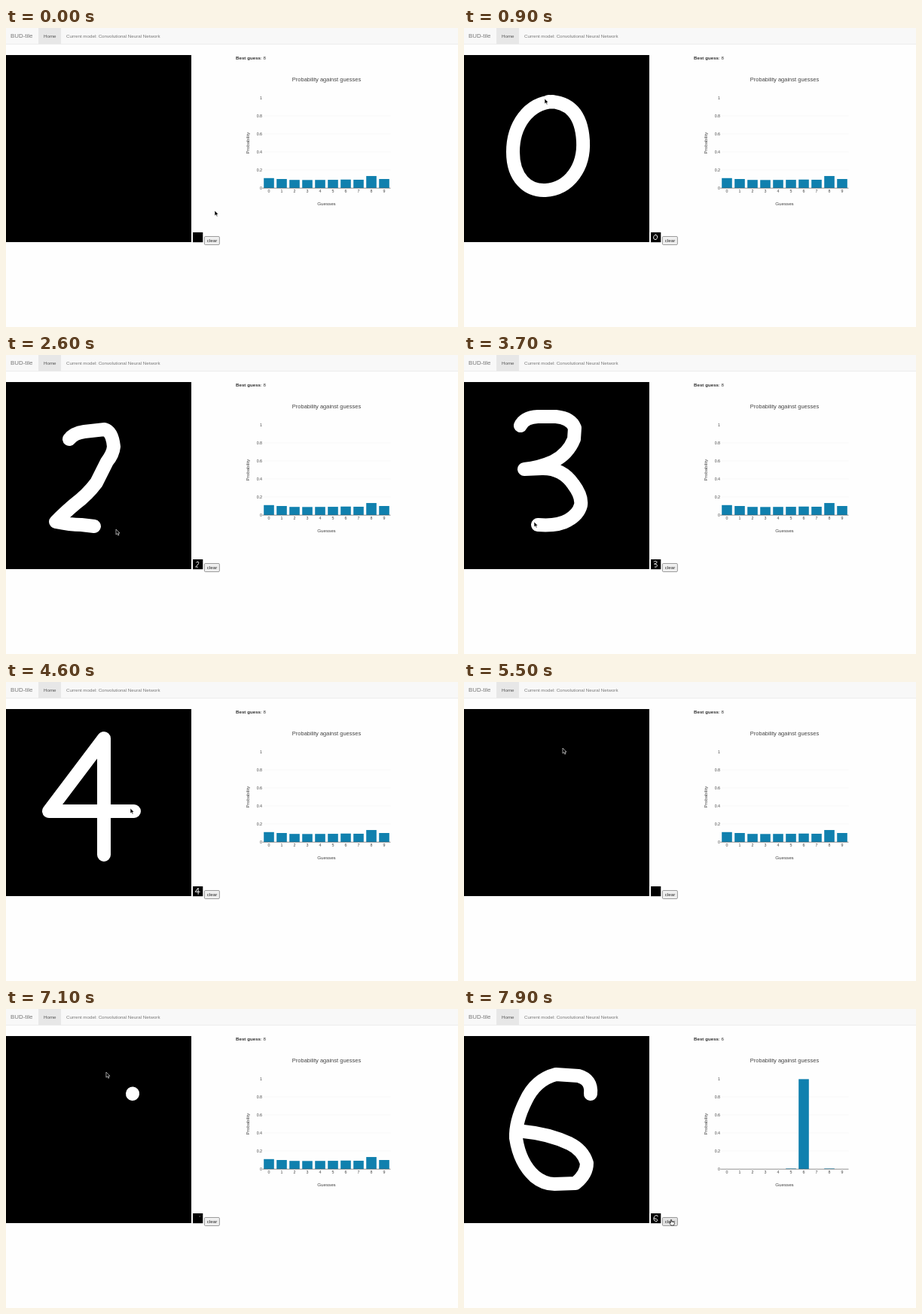
Animation, 600 px wide and 398 px high, one loop 8000 ms. Source, as an HTML page:

```html
<!DOCTYPE html>
<html>
<head>
<meta charset="utf-8">
<style>
  html, body { margin: 0; width: 100%; height: 100%; overflow: hidden; background: #fefefe; }
  svg { display: block; font: 6.2px "Liberation Sans", Arial, sans-serif; }
  #chart { fill: #444; text-anchor: middle; }
  .tick { font-size: 5.3px; }
</style>
</head>
<body>
<svg width="600" height="398" viewBox="0 0 600 398">
  <rect width="600" height="21.5" fill="#f8f8f8"/>
  <rect y="21.3" width="600" height=".6" fill="#e4e4e4"/>
  <rect x="43" width="30" height="21.5" fill="#e7e7e7"/>
  <g fill="#777">
    <text x="6" y="13.4" font-size="7.9">BUD-tile</text>
    <text x="50" y="13" fill="#555">Home</text>
    <text x="80" y="13">Current model: Convolutional Neural Network</text>
  </g>
  <rect y="36" width="246" height="249"/>
  <rect x="248" y="272" width="13.3" height="13.2"/>
  <path id="ink" pathLength="1" fill="none" stroke="#fff" stroke-width="18"
    stroke-linecap="round" stroke-linejoin="round"/>
  <use href="#ink" transform="translate(248 272) scale(.0535) translate(3 -36)"/>
  <rect id="button" x="263.4" y="277.5" width="20" height="11" rx="1.3" stroke="#767676" stroke-width=".7"/>
  <text x="273.5" y="285.1" text-anchor="middle" fill="#222">clear</text>
  <text x="305" y="42.2" fill="#333"><tspan font-weight="bold">Best guess</tspan>: <tspan id="guess"></tspan></text>
  <g id="chart">
    <text x="425.5" y="71" font-size="7.5">Probability against guesses</text>
    <text x="425.5" y="236.2">Guesses</text>
    <text transform="translate(323.4 153) rotate(-90)">Probability</text>
  </g>
  <path id="arrow" d="M0 0V7L1.7 5.6 2.8 8.1 4 7.6 2.9 5.1H5Z" stroke="#fff" stroke-width=".6"/>
  <path id="hand" d="M-.6 .6Q0-.4 .6 .6V3L3.8 3.8Q4.6 4.3 4.3 5.5L3.5 8H-.2L-2.4 5Q-2.4 4-1.4 4.4L-.6 5Z"
    fill="#fff" stroke="#111" stroke-width=".7"/>
</svg>
<script>
const LOOP = 8000, FRAME = 100, LEAD = 50, BASE = 213;
const $ = id => document.getElementById(id);

function add(tag, attrs, text = '') {
  const node = document.createElementNS('http://www.w3.org/2000/svg', tag);
  for (const key in attrs) node.setAttribute(key, attrs[key]);
  node.textContent = text;
  return $('chart').appendChild(node);
}

for (let i = 0; i <= 5; i++) {
  const y = BASE - 24 * i;
  if (i > 0 && i < 5) add('rect', { x: 342, y: y - .25, width: 168.5, height: .5, fill: '#eee' });
  add('text', { x: 340, y: y + 2, class: 'tick', style: 'text-anchor:end' }, String(i / 5));
}
const idle = [.11, .1, .09, .089, .09, .091, .094, .092, .133, .1];
const bars = idle.map((_, i) => {
  const x = 349 + 17 * i;
  add('text', { x, y: 219.2, class: 'tick' }, String(i));
  return add('rect', { x: x - 6.8, width: 13.6, fill: '#1080ae' });
});
add('rect', { x: 340.5, y: BASE - .2, width: 170, height: .6 });

// Stroke of each digit, then the times of its phases in ms.
const digits = [
  ['M118 98C85 100 65 130 65 165C65 200 85 217 108 216C140 214 160 185 158 150C156 115 140 98 112 98', 400, 900, 1000, 1100, 1300, 1500],
  ['M146 89L145 105 138 225', 1595, 1855, 1900, 2000, 2100, 2200],
  ['M84 112Q90 104 104 102L131 99Q141 102 143 122Q142 132 134 142L120 170Q108 186 92 198Q80 208 66 222Q85 226 100 226L117 228', 2200, 2500, 2700, 2800, 3000, 3200],
  ['M75 94Q80 83 98 82L122 82Q142 84 147 97L146 112Q138 132 118 142Q100 150 80 152L103 151Q130 150 145 172Q157 188 155 200Q152 212 138 220Q125 228 98 226', 3250, 3700, 3800, 3900, 4100, 4200],
  ['M130 230L130 75 57 172 170 172', 4150, 4600, 4700, 4800, 5100, 5300],
  ['M158 91L136 87 106 84 72 78 75 108 76 138 73 145 98 142 122 140 142 151Q156 165 156 182Q152 205 138 214Q120 222 106 222Q85 222 59 198', 5600, 6350, 6400, 6500, 6800, 7000],
  ['M168 113Q170 94 152 89L122 87Q95 94 82 122Q68 150 69 172Q74 205 94 223Q106 233 120 233L148 232Q163 220 163 205Q158 188 140 179Q112 166 79 163', 7100, 7550, 7600, 7700, 8000, 8100]
].map(([d, start, end, load, result, clear, blank], value) => {
  const path = document.createElementNS('http://www.w3.org/2000/svg', 'path');
  path.setAttribute('d', d);
  const length = path.getTotalLength();
  const at = p => {
    const { x, y } = path.getPointAtLength(p * length);
    return [x - 5, y - 4];
  };
  return { d, at, value, start, end, load, result, clear, blank };
});

// Pointer stops between the strokes.
const stops = [[0, 277, 243], [200, 412, 150], [2600, 146, 232], [5200, 290, 298], [5500, 131, 88], [6400, 133, 218]];
for (const g of digits) {
  stops.push([g.start - LEAD, ...g.at(0)], [g.end, ...g.at(1)], [g.clear - 100, 275, 280], [g.clear, 275, 280]);
}
stops.sort((a, b) => a[0] - b[0]);

const clamp = v => Math.max(0, Math.min(1, v));

function pointer(t) {
  const g = digits.find(g => t >= g.start - LEAD && t <= g.end);
  if (g) return g.at(clamp((t + LEAD - g.start) / (g.end - g.start)));
  const next = Math.max(1, stops.findIndex(s => s[0] > t));
  const [t0, x0, y0] = stops[next - 1], [t1, x1, y1] = stops[next];
  const p = clamp((t - t0) / (t1 - t0));
  return [x0 + (x1 - x0) * p, y0 + (y1 - y0) * p];
}

function draw(t) {
  const drawn = digits.find(g => t >= g.start && t < g.clear);
  $('ink').style.display = drawn ? '' : 'none';
  if (drawn) {
    const p = clamp((t - drawn.start) / (drawn.end - drawn.start));
    $('ink').setAttribute('d', drawn.d);
    $('ink').setAttribute('stroke-dasharray', p < 1 ? `${Math.max(p, .001)} 3` : 'none');
  }

  const loading = digits.some(g => t >= g.load && t < g.result || t >= g.clear && t < g.blank);
  const found = digits.find(g => t >= g.result && t < g.blank);
  $('guess').textContent = loading ? 'Loading...' : found ? found.value : 8;
  bars.forEach((bar, i) => {
    const rest = found && found.value === 6 && (i === 5 || i === 8) ? .005 : 0;
    const height = 120 * (!found ? idle[i] : found.value === i ? .997 : rest);
    bar.setAttribute('y', BASE - height);
    bar.setAttribute('height', height);
  });

  const [x, y] = pointer(t);
  const over = x > 263 && x < 284 && y > 277 && y < 289;
  $('button').setAttribute('fill', over ? '#e3e3e3' : '#efefef');
  $('arrow').style.display = over ? 'none' : '';
  $('hand').style.display = over ? '' : 'none';
  $(over ? 'hand' : 'arrow').setAttribute('transform', `translate(${x} ${y})`);
}

const origin = performance.now();
function tick() {
  const t = (performance.now() - origin) % LOOP;
  draw(Math.floor(t / FRAME) * FRAME);
  requestAnimationFrame(tick);
}
tick();
</script>
</body>
</html>
```
